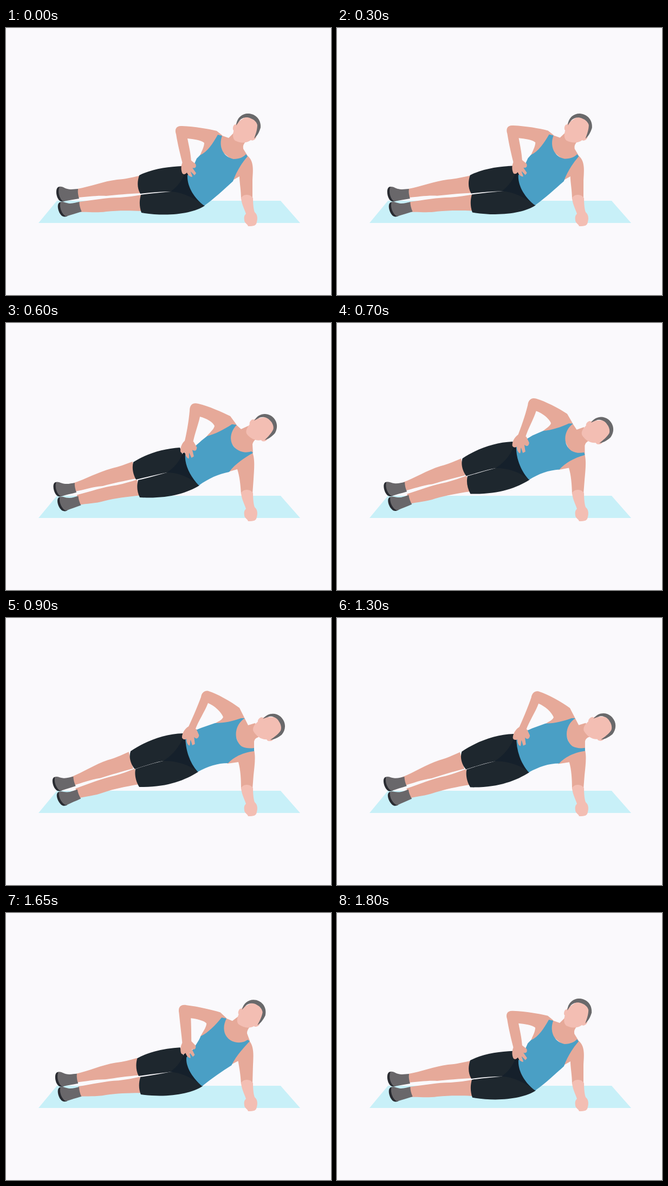
An HTML page that plays this animation: 600 by 493 pixels, repeating every 1.85 s.

```html
<!DOCTYPE html>
<html lang="en">
<head>
<meta charset="utf-8">
<title>Side plank hip raise</title>
<style>
  html, body { margin: 0; width: 100%; height: 100%; overflow: hidden; background: #faf9fc; }
  svg { display: block; width: 100%; height: 100%; }
  .mat { fill: #c8f0f8; }
  .skin { fill: #e6a999; }
  .light { fill: #f3beb3; }
  .shirt { fill: #4a9fc5; }
  .shorts { fill: #1e272e; }
  .shade { fill: #15202b; }
  .shoe { fill: #69676a; }
  .sole { fill: #292b31; }
  .hair { fill: #69696b; }
</style>
</head>
<body>
<svg viewBox="0 0 600 493" preserveAspectRatio="none">
  <defs>
    <g id="shoe">
      <path class="sole" d="M99 293C91 293 92 308 96 315C99 321 104 321 108 320Z"/>
      <path class="shoe" d="M99 293C104 292 108 296 113 297C120 299 127 297 133 297Q132 306 135 315C125 317 115 318 107 320C101 320 94 304 99 293Z"/>
    </g>
  </defs>
  <path class="mat" d="M94 319H507L543 360H60Z"/>

  <g id="topLeg"><path class="skin" d="M132 297C155 293 180 283 205 280C220 279 232 276 246 273L248 305C225 306 205 308 185 310C165 309 150 312 133 313Z"/></g>
  <g id="topShoe"><use href="#shoe"/></g>
  <path id="topShorts" class="shorts"/>
  <g id="lowLeg"><path class="skin" d="M134 321C160 318 185 313 210 313C225 312 238 310 250 308V338C225 337 205 337 185 339C165 342 150 339 136 340Z"/></g>
  <g id="lowShoe"><use href="#shoe"/></g>
  <path id="lowShorts" class="shorts"/>
  <path id="shade" class="shade"/>

  <path id="chest" class="skin"/>
  <path id="propArm" class="skin"/>
  <path id="bentArm" class="skin"/>
  <path id="shirt" class="shirt"/>
  <g id="hand"><path class="skin" d="M327 246C322 254 323 264 326 269Q330 272 334 267C336 272 340 275 344 275C344 271 341 268 341 265L348 272L351 268L344 258C350 260 352 256 350 251L341 244Z"/></g>
  <path class="light" d="M434 314C438 306 451 306 456 314C456 325 457 335 459 340C464 344 465 351 463 358C462 365 458 366 447 366C446 362 440 360 440 355C439 349 440 346 443 343C440 334 435 325 434 314Z"/>

  <g id="head">
    <ellipse class="light" cx="422.500" cy="184" rx="3.500" ry="6" transform="rotate(12 422.500 184)"/>
    <ellipse class="light" cx="457" cy="203" rx="3.500" ry="6" transform="rotate(50 457 203)"/>
    <path class="light" d="M425 176C418 193 417 203 423 208C433 213 444 213 452 207L461 198L467 175L445 162Z"/>
    <path class="hair" d="M425 180C426 165 437 157 449 158C464 160 471 172 470 184C467 194 463 200 458 204C461 196 464 188 464 179C463 174 458 169 452 167C444 163 436 166 432 170C429 174 427 177 425 180Z"/>
  </g>
</svg>
<script>
const LOOP = 1850, STEP = 50, RAISE = 300, LOWER = 1300, STEPS = 11.5;
const MID = 2 / 3;

// Soft parts: outlines at the lowered, middle and raised pose.
const shapes = {
  topShorts: [
    'M246 272 C270 260 300 256 325 255 L340 295 L304 302 C285 302 265 304 248 306 C242 296 242 284 246 272Z',
    'M235 257 C260 241 290 232 321 230 L336 270 L297 276 C278 280 258 285 240 289 C235 280 232 268 235 257Z',
    'M230 246 C255 229 290 214 327 213 L336 255 L290 264 C272 267 254 274 238 279 C231 271 226 258 230 246Z'],
  lowShorts: [
    'M249 308 C268 305 286 304 304 302 L345 300 L367 328 C345 343 298 349 250 341 C246 330 246 319 249 308Z',
    'M244 290 C262 286 280 281 297 276 L338 270 L357 300 C333 315 296 325 247 322 C242 312 241 301 244 290Z',
    'M239 279 C256 273 273 268 290 264 L332 250 L355 284 C330 300 296 313 246 312 C240 302 237 290 239 279Z'],
  shade: [
    'M304 302 C318 292 327 279 332 262 L337 270 L367 328 C348 314 326 303 304 302Z',
    'M297 276 C312 266 322 254 328 236 L333 245 L357 300 C341 286 319 276 297 276Z',
    'M290 264 C307 254 320 238 328 219 L333 225 L355 284 C337 270 313 263 290 264Z'],
  chest: [
    'M397 198 L411 203 L420 194 L444 208 Q436 216 438 223 L446 236 L420 246 L395 225Z',
    'M424 187 L434 196 L447 190 L464 212 Q456 218 455 224 L456 240 L430 240 L410 215Z',
    'M440 184 L447 198 L460 194 L466 220 Q459 222 458 228 L458 246 L430 236 L420 205Z'],
  propArm: [
    'M446 236 C458 246 456 262 455 280 L455 316 L434 316 C434 300 431 285 431 274 L417 282 L430 245Z',
    'M455 239 C460 252 458 270 457 288 L455 316 L434 316 C433 298 431 282 427 270 L410 275 L430 248Z',
    'M458 244 C461 256 459 272 457 290 L455 316 L434 316 C434 298 433 280 429 266 L408 269 L432 246Z'],
  bentArm: [
    'M399 198 L389 190 C372 186 350 182 325 181 C314 180 311 187 314 196 C317 215 322 235 326 250 L342 247 C341 230 337 215 335 204 C346 205 360 207 366 212 C366 220 360 230 357 238 L400 225Z',
    'M425 187 L414 172 C398 164 375 154 355 149 C343 146 339 153 339 162 C337 185 333 205 329 222 L345 222 C348 205 355 188 358 173 C370 176 382 183 385 190 C384 197 374 204 370 210 L420 210Z',
    'M440 184 L431 166 C415 154 390 140 374 135 C366 133 361 139 360 146 C353 165 343 188 335 205 L349 207 C355 190 367 173 373 157 C385 162 397 173 401 183 C398 190 390 191 386 195 L432 200Z'],
  shirt: [
    'M391 197 L399 199 C392 218 400 238 420 242 C431 242 439 238 443 233 L446 237 C434 251 425 266 419 283 C402 298 386 314 366 328 C347 314 334 292 335 272 C344 262 347 252 352 241 L358 235 C372 229 382 213 391 197Z',
    'M417 187 L426 188 C411 203 411 226 429 235 C438 240 446 239 453 237 L456 240 C441 248 422 261 412 275 C392 279 374 287 356 300 C340 283 329 261 331 243 C340 236 351 226 361 217 L371 209 C386 205 402 197 417 187Z',
    'M434 185 L441 185 C423 196 418 223 435 237 C443 241 451 241 458 240 L458 246 C439 248 421 256 410 268 C390 268 373 274 354 284 C338 266 331 242 331 216 C340 212 348 208 360 203 L386 194 C404 194 420 190 434 185Z']
};

// Stiff parts: two tracked points (x1, y1, x2, y2) at the same three poses.
const rigs = {
  topLeg: [[134, 306, 245, 290], [128, 304, 235, 273], [124, 302, 229, 264]],
  lowLeg: [[136, 330, 249, 323], [134, 326, 243, 304], [132, 323, 240, 293]],
  topShoe: [[95, 295, 134, 306], [89, 296, 128.5, 304], [87, 296, 126.5, 301.5]],
  lowShoe: [[97, 324, 137.5, 330], [96, 324, 136, 328], [94.5, 324, 135, 325]],
  hand: [[333, 248, 340, 271], [337, 220, 335, 245], [342, 205, 337, 230]],
  head: [[422, 183, 458, 205], [454, 182, 477, 217], [470, 187, 487, 226]]
};
rigs.lowShoe.rest = rigs.topShoe[0];

const byId = id => document.getElementById(id);
const numbers = path => path.match(/[\d.]+/g).map(Number);
const outlines = Object.entries(shapes).map(([id, poses]) =>
  ({ el: byId(id), template: poses[0], poses: poses.map(numbers) }));
const joints = Object.entries(rigs).map(([id, poses]) =>
  ({ el: byId(id), poses, rest: poses.rest || poses[0] }));

// Quadratic curve through the three poses.
function blend([low, mid, high], p) {
  const a = (p - MID) * (p - 1) / MID;
  const b = p * (p - 1) / (MID * (MID - 1));
  const c = p * (p - MID) / (1 - MID);
  return low.map((v, i) => a * v + b * mid[i] + c * high[i]);
}

// Rotation, scale and shift that carry one point pair onto another.
function fit([ax, ay, bx, by], [cx, cy, dx, dy]) {
  const ux = bx - ax, uy = by - ay, vx = dx - cx, vy = dy - cy;
  const len = ux * ux + uy * uy;
  const re = (ux * vx + uy * vy) / len, im = (ux * vy - uy * vx) / len;
  return `matrix(${[re, im, -im, re, cx - re * ax + im * ay, cy - im * ax - re * ay]})`;
}

function ease(time, start) {
  const step = Math.max(0, Math.floor((time - start) / STEP) + 1);
  return (1 - Math.cos(Math.PI * Math.min(1, step / STEPS))) / 2;
}

function draw(time) {
  const p = ease(time, RAISE) - ease(time, LOWER);
  for (const { el, template, poses } of outlines) {
    const values = blend(poses, p);
    let i = 0;
    el.setAttribute('d', template.replace(/[\d.]+/g, () => values[i++].toFixed(2)));
  }
  for (const { el, poses, rest } of joints) {
    el.setAttribute('transform', fit(rest, blend(poses, p)));
  }
}

const start = performance.now();
function tick() {
  draw((performance.now() - start) % LOOP);
  requestAnimationFrame(tick);
}
tick();
</script>
</body>
</html>
```
